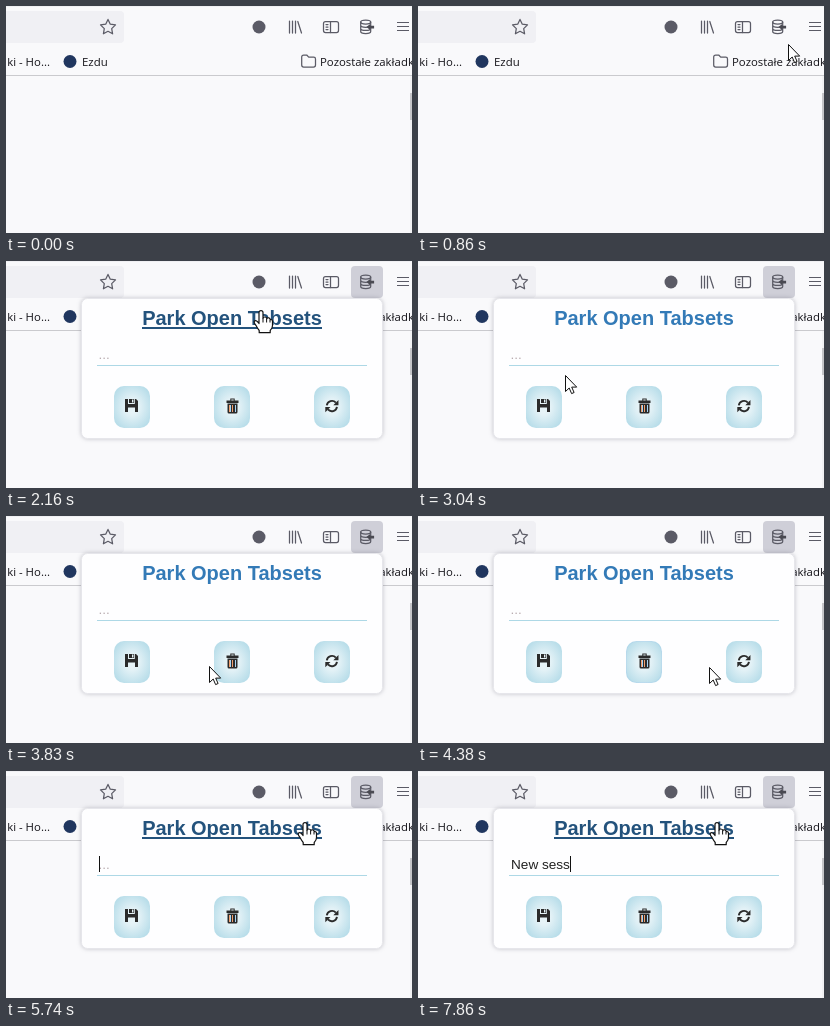
These frames come from a looping animation (406x227 px, 8 s). An HTML page:

```html
<!DOCTYPE html>
<html lang="en">
<head>
<meta charset="utf-8">
<title>Session popup</title>
<style>
  html, body { margin: 0; width: 100%; height: 100%; overflow: hidden; background: #f9f9fb; }
  svg { display: block; width: 100vw; height: 100vh; }
  .bar { font: 11.4px "Open Sans", "Noto Sans", sans-serif; fill: #15141a; }
  .line { fill: none; stroke: #5b5b66; stroke-width: 1.25; stroke-linecap: round; stroke-linejoin: round; }
  #popup .panel { fill: #fefeff; stroke: #e6e6eb; filter: drop-shadow(0 0 2px rgba(60, 60, 80, .28)); }
  #title { font: bold 20px "Liberation Sans", Arial, sans-serif; fill: #337ab7; text-anchor: middle; }
  #title.hover { fill: #23527c; }
  #typed, #hint { font: 13.6px "Liberation Sans", Arial, sans-serif; fill: #222; white-space: pre; }
  #hint { fill: #b9acb0; }
  .glyph { fill: #2b2b2b; }
</style>
</head>
<body>
<svg viewBox="0 0 406 227" preserveAspectRatio="none">
  <defs>
    <radialGradient id="glow" r=".68">
      <stop offset="0" stop-color="#f0f8fa"/>
      <stop offset=".3" stop-color="#e2f1f6"/>
      <stop offset="1" stop-color="#add8e6"/>
    </radialGradient>
  </defs>

  <!-- Browser toolbar -->
  <rect width="406" height="227" fill="#f9f9fb"/>
  <rect width="406" height="1" fill="#f0f0f3"/>
  <rect x="-10" y="5" width="128" height="32" rx="4" fill="#f0f0f4"/>
  <path class="line" d="M102 13.4l2.3 4.8 5.2.7-3.8 3.7.9 5.2-4.6-2.5-4.6 2.5.9-5.2-3.8-3.7 5.2-.7z"/>
  <circle cx="253" cy="21" r="6.5" fill="#5b5b66"/>
  <path class="line" d="M283.5 15v12M286.5 15v12M289.5 15v12M291.8 15.5l3.7 11.5"/>
  <g class="line">
    <rect x="317.5" y="15.5" width="15" height="11" rx="2"/>
    <path d="M324.5 15.5v11M320 18.5h2M320 21h2M320 23.5h2"/>
  </g>
  <rect id="toolButton" x="345" y="5" width="32" height="32" rx="4"/>
  <g class="line">
    <ellipse cx="359.7" cy="16" rx="5" ry="2"/>
    <path d="M354.7 16v9.5c0 2.7 10 2.7 10 0V16M354.7 19.3c0 2.6 10 2.6 10 0M354.7 22.5c0 2.6 10 2.6 10 0"/>
  </g>
  <path d="M360.5 21l3.6-3v1.7h4v2.8h-4V24z" fill="#4a4a52"/>
  <path d="M391 16.5h12M391 20.5h12M391 24.5h12" stroke="#5b5b66"/>

  <!-- Bookmarks bar and page -->
  <rect id="folderHover" x="290" y="44" width="120" height="22" rx="4" fill="#e0e0e6"/>
  <text class="bar" x="44" y="60" text-anchor="end">ki - Ho...</text>
  <circle cx="64" cy="55.5" r="6.5" fill="#20365f"/>
  <text class="bar" x="76" y="60">Ezdu</text>
  <path class="line" d="M295.7 59V51q0-2 2-2h3l2 2.2h5q1.8 0 1.8 1.8v6q0 2-2 2h-9.8q-2 0-2-2z"/>
  <text class="bar" x="314" y="60">Pozostałe zakładk</text>
  <rect y="69" width="406" height="1" fill="#cacace"/>
  <rect x="404" y="70" width="2" height="157" fill="#f1f1f3"/>
  <rect x="404" y="87" width="2" height="27" fill="#c6c6c9"/>

  <g id="popup">
    <rect class="panel" x="75.5" y="37.5" width="301" height="140" rx="6"/>
    <text id="title" x="226" y="64">Park Open Tabsets</text>
    <rect id="underline" x="136" y="66" width="180" height="2" fill="#23527c"/>
    <text id="hint" x="92.5" y="98">...</text>
    <text id="typed" x="93" y="98"></text>
    <rect id="caret" y="85" width="1" height="16" fill="#111"/>
    <rect x="91" y="104" width="270" height="1" fill="#add8e6"/>
    <g id="buttons"></g>
    <g transform="translate(119 138)">
      <path class="glyph" d="M0 0h11l2 2v11H0z"/>
      <path d="M3 8.5h7V13H3zM3 0h1v4h5V0h.8v5H3zM7 .6h1.4v2.8H7z" fill="#e6f3f7"/>
    </g>
    <g transform="translate(220 137)">
      <path class="glyph" d="M.5 2.5h3.8V.5h4.4v2h3.8V5H.5zM1.5 5.5h10V14q0 1.5-1.5 1.5H3Q1.5 15.5 1.5 14z"/>
      <path d="M5.3 1.5h2.4v1H5.3z" fill="#e6f3f7"/>
      <path d="M3.5 7v7M6.5 7v7" stroke="#f0a070"/>
      <path d="M4.5 7v7M9.5 7v7" stroke="#a8d4f4"/>
    </g>
    <g transform="translate(319.3 138.5) scale(.94)">
      <path d="M1.6 6.2A5.5 5.5 0 0 1 11.2 3.4M12.4 7.8A5.5 5.5 0 0 1 2.8 10.6" fill="none" stroke="#2b2b2b" stroke-width="2"/>
      <path class="glyph" d="M14 .5v5.5H8.5zM0 13.5V8h5.5z"/>
    </g>
  </g>

  <g id="cursor" stroke="#111" stroke-linejoin="round">
    <path id="arrow" fill="#fff" d="M.5 .5v16l3.7-3.5 2.4 5.6 2.5-1.1-2.4-5.4h5z"/>
    <g id="hand" transform="translate(-2 .5)">
      <path fill="#fff" stroke-width="1.2" d="M-2 13V2Q-2 .2 0 .2T2 2v6q.2-1.7 2-1.5 1.7.1 1.8 1.8.4-1.3 2-1 1.4.3 1.4 1.9 2.3-.6 2.3 1.8v4q0 3-2.3 5v2.2H-1.8V20q-1.7-2-3.3-5.2-2.5-3.3-1.3-4.3 1.4-1 3.2 1z"/>
      <path fill="none" d="M2 8v4M5.6 8.5V12M9 9.5V12"/>
    </g>
    <path id="beam" fill="none" d="M-3 -8.5h2.5l.5.5.5-.5H3M0 -8V8M-3 8.5h2.5L0 8l.5.5H3"/>
  </g>
</svg>
<script>
  const LOOP = 8000, FADE = 380;
  const $ = id => document.getElementById(id);
  const clamp = v => Math.max(0, Math.min(1, v));
  const smooth = v => (v = clamp(v), v * v * (3 - 2 * v));
  const show = (el, on) => el.setAttribute('visibility', on ? 'visible' : 'hidden');
  const set = (el, attrs) => { for (const k in attrs) el.setAttribute(k, attrs[k]); };

  // Pointer path: time, x, y
  const path = [
    [240, 377, 201], [400, 378, 165], [600, 377, 100], [800, 372, 46], [1020, 365, 17],
    [1680, 365, 17], [1800, 345, 24], [2160, 257, 49], [2470, 190, 59],
    [2560, 190, 59], [2900, 160, 98], [3200, 133, 132], [3350, 126, 144],
    [3430, 126, 144], [3530, 156, 150], [3830, 203, 150], [4230, 278, 154],
    [4300, 280, 153], [4500, 308, 149], [4700, 337, 146],
    [4860, 337, 146], [5020, 291, 115], [5250, 292, 101], [5590, 300, 95],
    [5739, 300, 95], [5740, 301, 51]
  ];

  // Typing: time, text, caret shown
  const typing = [
    [0, '', 0], [5510, '', 1], [5980, '', 0], [6390, 'N', 1], [6550, 'N', 0],
    [6860, 'Ne', 1], [7050, 'New', 1], [7130, 'New ', 1], [7380, 'New s', 1],
    [7550, 'New s', 0], [7620, 'New se', 1], [7780, 'New ses', 1], [7860, 'New sess', 1]
  ];

  function addRect(attrs) {
    const el = document.createElementNS('http://www.w3.org/2000/svg', 'rect');
    set(el, attrs);
    $('buttons').append(el);
    return el;
  }

  const buttons = [
    { x: 108, enter: 3260, leave: 3460 },
    { x: 208, enter: 3857, leave: 4050 },
    { x: 308, enter: 4500, leave: 4960 }
  ];
  for (const b of buttons) {
    b.face = addRect({ x: b.x, y: 125, width: 36, height: 42, fill: 'url(#glow)' });
    b.border = addRect({ x: b.x + .5, y: 125.5, width: 35, height: 41, fill: 'none', stroke: '#3350f0' });
  }

  const lastStep = (steps, t) => steps.reduce((found, s) => s[0] <= t ? s : found);

  function pointerAt(t) {
    const i = path.findIndex(p => p[0] > t);
    if (i < 0) return path[path.length - 1].slice(1);
    if (i === 0) return path[0].slice(1);
    const [t0, x0, y0] = path[i - 1], [t1, x1, y1] = path[i];
    const k = (t - t0) / (t1 - t0);
    return [x0 + (x1 - x0) * k, y0 + (y1 - y0) * k];
  }

  function drawPopup(t, overTitle) {
    const open = smooth((t - 1150) / 250);
    set($('popup'), { opacity: open, transform: `translate(0 ${-8 * (1 - open)})` });
    $('title').classList.toggle('hover', overTitle);
    set($('underline'), { opacity: overTitle ? 1 : 0 });

    for (const b of buttons) {
      const h = smooth((t - b.enter) / FADE) * (1 - smooth((t - b.leave) / FADE));
      const corner = { rx: 10 + 8 * h, ry: 10 + 11 * h };
      set(b.face, corner);
      set(b.border, { ...corner, opacity: h });
    }

    const [, text, caretOn] = lastStep(typing, t);
    $('typed').textContent = text;
    set($('hint'), { opacity: text ? 0 : 1 });
    const width = text ? $('typed').getComputedTextLength() : 0;
    set($('caret'), { x: Math.floor(93.2 + width), opacity: caretOn });
  }

  function draw(t) {
    const [x, y] = pointerAt(t).map(Math.round);
    const within = (l, top, r, b) => x >= l && x < r && y >= top && y < b;
    const ready = t >= 1440;
    const overTitle = ready && within(136, 47, 316, 71);
    const overButton = ready && buttons.some(b => within(b.x, 125, b.x + 36, 167));
    const overInput = ready && within(91, 84, 361, 106);
    const shape = overTitle || overButton ? 'hand' : overInput ? 'beam' : 'arrow';

    const active = t >= 240;
    set($('cursor'), { transform: `translate(${x} ${y})` });
    for (const id of ['arrow', 'hand', 'beam']) show($(id), active && id === shape);

    show($('folderHover'), active && t < 1090 && within(290, 43, 406, 67));
    const overTool = active && within(345, 5, 377, 37);
    $('toolButton').setAttribute('fill', t >= 1090 ? '#cfcfd8' : overTool ? '#e0e0e6' : 'none');
    drawPopup(t, overTitle);
  }

  const start = performance.now();
  function tick() {
    draw((performance.now() - start) % LOOP);
    requestAnimationFrame(tick);
  }
  tick();
</script>
</body>
</html>
```
